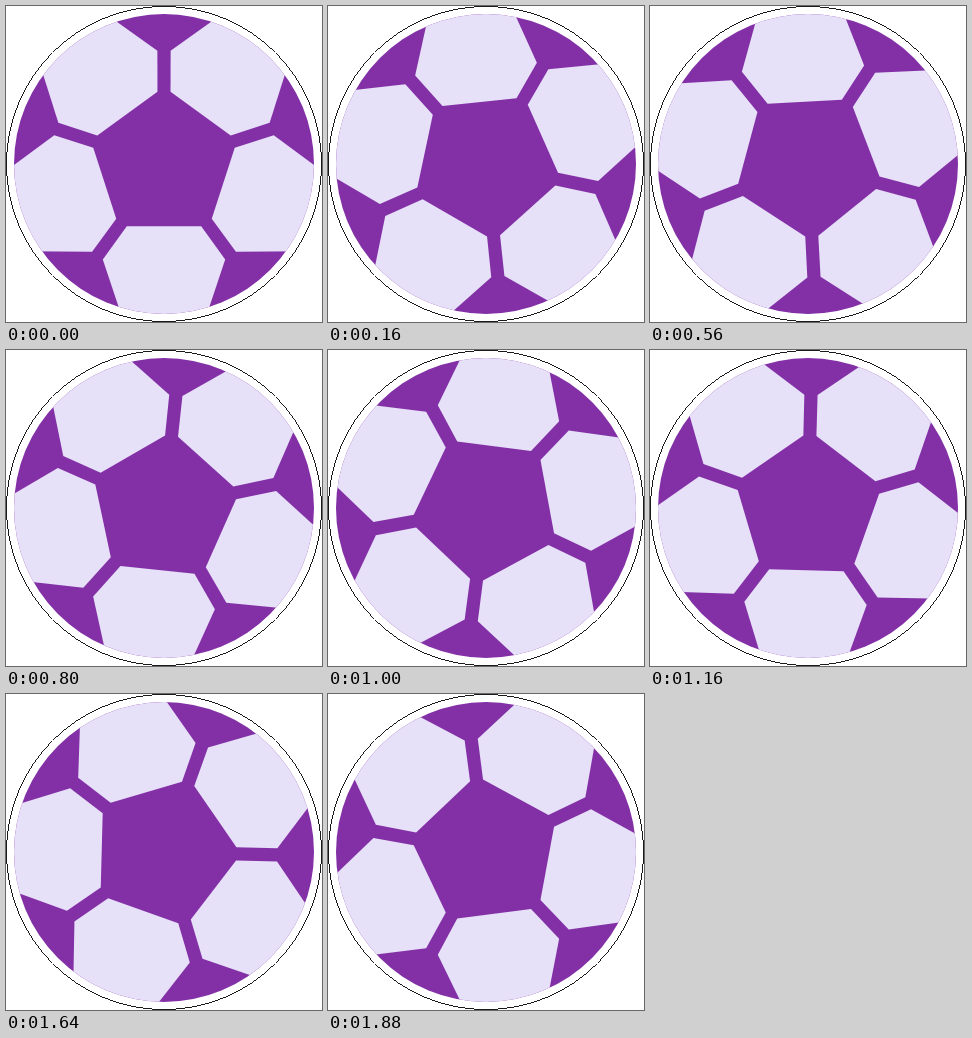
Write an HTML page that moves like this. It is 316 px wide and 316 px high and loops after 1.92 s.

```html
<!DOCTYPE html>
<html lang="en">
<head>
<meta charset="utf-8">
<title>Rolling ball</title>
<style>
  html, body { margin: 0; width: 100%; height: 100%; overflow: hidden; background: #fff; }
  svg { display: block; width: 100vw; height: 100vh; }
</style>
</head>
<body>
<svg viewBox="-158 -158 316 316">
  <clipPath id="disc"><circle r="150"/></clipPath>
  <circle r="157.6" fill="#fff" stroke="#000" stroke-width=".9" shape-rendering="crispEdges"/>
  <circle r="150" fill="#8330a7"/>
  <g clip-path="url(#disc)"><g id="panels" fill="#e6e0f8"></g></g>
</svg>
<script>
  const LOOP = 1920, STEP = 40;
  const panels = document.getElementById('panels');
  const panel = '<path d="M-37.2 62.3H37.2L61.2 95.5L40 159H-40L-61.2 95.5Z"';
  for (let i = 0; i < 5; i++) {
    panels.innerHTML += `${panel} transform="rotate(${i * 72})"/>`;
  }

  // One clockwise turn per loop, advanced in fixed steps
  function draw() {
    const t = performance.now() % LOOP;
    const angle = Math.floor(t / STEP) * STEP / LOOP * 360;
    panels.setAttribute('transform', `rotate(${angle})`);
    requestAnimationFrame(draw);
  }
  draw();
</script>
</body>
</html>
```
